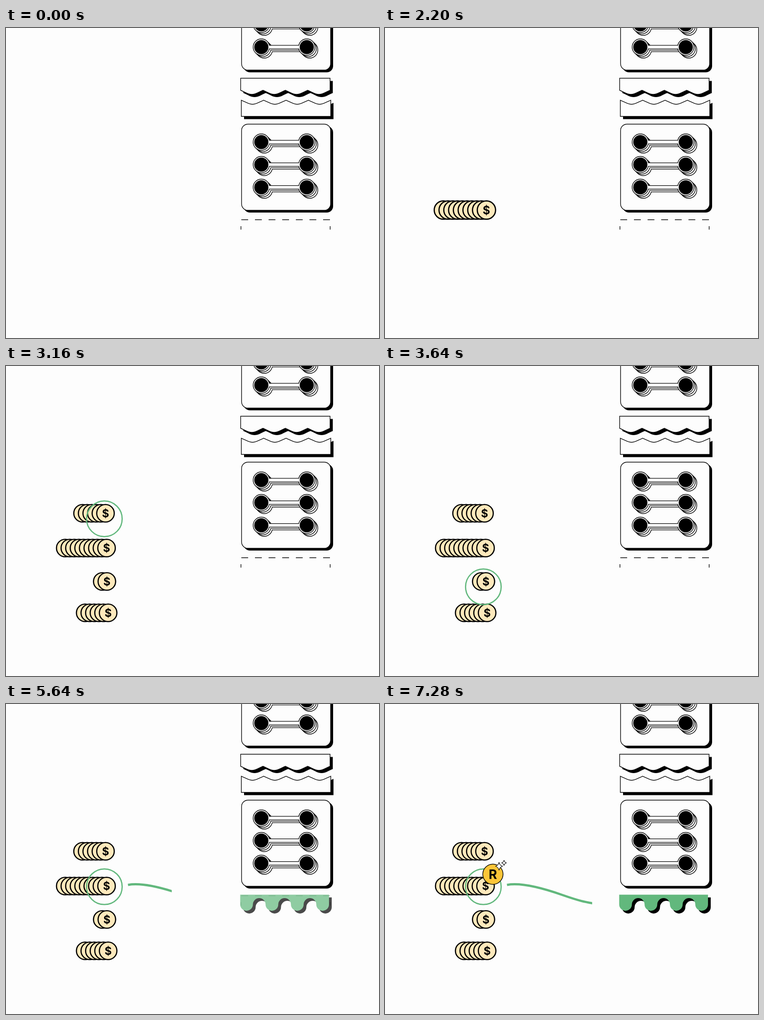
An HTML page that plays this animation: 821x682 px, repeating every 8 s.

```html
<!DOCTYPE html>
<html lang="en">
<head>
<meta charset="utf-8">
<style>
  html, body { margin: 0; width: 100%; height: 100%; overflow: hidden; background: #fdfdfd; }
  svg { display: block; }
  text { font: 700 24px Inter, Arial, sans-serif; text-anchor: middle; }
  .out { fill: #fdfdfd; stroke: #000; stroke-width: 1.4; }
  .coin { fill: #fee9bc; stroke: #000; stroke-width: 2.6; }
</style>
</head>
<body>
<svg width="821" height="682" viewBox="0 0 821 682">
  <defs>
    <g id="bell">
      <path d="M562 0H662" stroke="#000" stroke-width="9"/>
      <circle class="out" cx="562" r="18"/><circle class="out" cx="662" r="18"/>
      <path d="M562 0H662" stroke="#fdfdfd" stroke-width="6.4"/>
    </g>
    <g id="bar">
      <use href="#bell" x="6.4" y="6.2"/><use href="#bell" x="3.2" y="3.1"/><use href="#bell"/>
      <circle cx="562" r="15.6"/><circle cx="662" r="15.6"/>
    </g>
    <g id="block">
      <rect x="523" y="216" width="197" height="190" rx="14"/>
      <rect class="out" x="518.5" y="211.5" width="196" height="189.5" rx="14"/>
      <use href="#bar" y="251"/><use href="#bar" y="300.5"/><use href="#bar" y="350.5"/>
    </g>
    <path id="upper"/><path id="lower"/><path id="drip"/>
    <clipPath id="reveal"><rect id="window" x="260" y="380" height="80"/></clipPath>
  </defs>

  <use href="#block" y="-308.5"/>
  <use href="#upper" x="6" y="6"/><use href="#upper" class="out"/>
  <use href="#lower" x="6" y="6"/><use href="#lower" class="out"/>
  <use href="#block"/>

  <g id="slot" fill="none" stroke="#000" stroke-width="1.4">
    <path d="M518 421.7H714" stroke-dasharray="15 15"/>
    <path d="M517.2 436V443.5M713.5 436V443.5"/>
  </g>
  <g id="piece"><use href="#drip" x="6" y="6"/><use href="#drip" fill="#62b87d"/></g>

  <g id="rows"></g>
  <circle id="ring" cx="216.5" r="39.2" fill="none" stroke="#62b87d" stroke-width="2.7"/>
  <path id="line" d="M268.500 398C300 392 350 406 390 420S440 435.500 466 440" fill="none" clip-path="url(#reveal)"/>

  <g id="reward">
    <circle r="22.3" fill="#fdc538" stroke="#000" stroke-width="1.5"/>
    <text y="10" style="font-size:28px">R</text>
    <g class="out" style="stroke-width:1.2">
      <path d="M13.500 -26.500q1.500 7.500 8 9q-6.500 1.500 -8 9q-1.500 -7.500 -8 -9q6.500 -1.500 8 -9z"/>
      <path d="M24.500 -31q1 5 5.500 6q-4.500 1 -5.500 6q-1 -5 -5.500 -6q4.500 -1 5.500 -6z"/>
    </g>
  </g>
</svg>
<script>
const $ = id => document.getElementById(id);
const set = (id, attrs) => { for (const k in attrs) $(id).setAttribute(k, attrs[k]); };
const clamp = u => Math.min(1, Math.max(0, u));
const span = (t, start, length) => clamp((t - start) / length);
const mix = (a, b, u) => a + (b - a) * u;
const ease = u => u ** 1.75 / (u ** 1.75 + (1 - u) ** 1.75);
const pop = u => u <= 0 ? 0 : 1 + 3.05 * (u - 1) ** 3 + 2.05 * (u - 1) ** 2;

// Torn edges and the dripping piece
const scallops = 'c12 5 16 9 24.600 9s12.600 -4 24.600 -9'.repeat(4);
set('upper', { d: `M713.3 110.5H516.5V137${scallops}z` });
set('lower', { d: `M518 194.5V158.8${scallops}V194.5z` });
let drip = 'M515.5 419.5V441';
for (let i = 0; i < 7; i++) drip += `a13.96 13.96 0 0 ${i % 2} 27.92 0`;
set('drip', { d: drip + 'V419.5z' });

// Coin rows: last coin x, y, count, start time
const step = 10.1;
const rows = [[219, 324, 6, 2200], [221.3, 400.5, 10, 2000], [222, 474, 2, 2400], [224.8, 543, 6, 2600]];
$('rows').innerHTML = rows.map(([x, y, n], r) => {
  const half = (n - 1) * step / 2;
  let coins = '';
  for (let i = 0; i < n; i++) coins += `<circle class="coin" cx="${i * step - half}" r="19.3"/>`;
  return `<g id="row${r}">${coins}<text x="${half}" y="8.7">$</text></g>`;
}).join('');

function draw(now) {
  const t = now % 8000;

  rows.forEach(([x, y, n, start], r) => set('row' + r, {
    transform: `translate(${x - (n - 1) * step / 2} ${y}) scale(${pop(span(t, start, 240))})`
  }));

  const down = ease(span(t, 3080, 640)), up = ease(span(t, 3720, 400));
  set('ring', { cy: 331 + 160 * down - 89 * up, opacity: span(t, 2980, 120) });

  const fill = ease(span(t, 4880, 1220));
  set('piece', { opacity: fill });
  set('slot', { opacity: 1 - fill });

  const ink = ease(span(t, 5160, 440));
  set('window', { width: 25 + 171 * ease(span(t, 4880, 1580)) });
  set('line', {
    opacity: span(t, 4840, 120),
    stroke: `rgb(${mix(0, 98, ink)},${mix(0, 184, ink)},${mix(0, 125, ink)})`,
    'stroke-width': mix(1.4, 5, ink)
  });

  set('reward', { transform: `translate(237.5 374.5) scale(${pop(span(t, 6820, 440))})` });
}

let begin;
function frame(now) {
  begin ??= now;
  draw(now - begin);
  requestAnimationFrame(frame);
}
draw(0);
requestAnimationFrame(frame);
</script>
</body>
</html>
```
